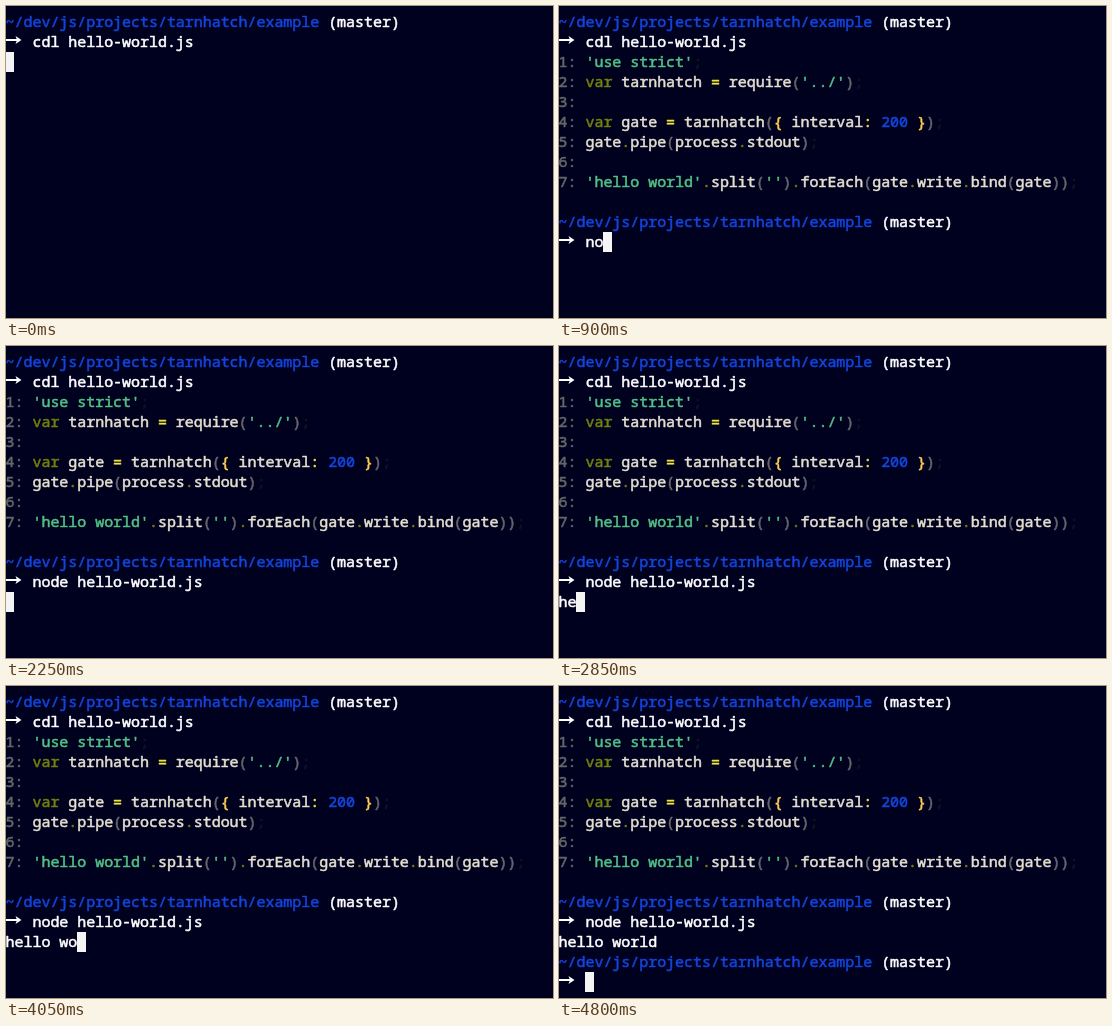
An HTML page with a canvas that plays this animation: 547 by 312 pixels, repeating every 5940 ms.

```html
<!DOCTYPE html>
<html lang="en">
<head>
<meta charset="utf-8">
<title>Terminal session</title>
<style>
html, body { margin: 0; width: 100%; height: 100%; overflow: hidden; background: #00001f; }
canvas { display: block; width: 547px; height: 312px; }
</style>
</head>
<body>
<canvas id="term" width="547" height="312"></canvas>
<script>
const ctx = document.getElementById('term').getContext('2d');
const CELL = 8.96, ROW = 20, TOP = 6, LOOP = 5940;

const color = {
  w: '#ffffff', // typed text
  b: '#1444dc', // path and numbers
  g: '#65676a', // gutter and parentheses
  s: '#52c285', // strings
  k: '#74800c', // keywords and dots
  i: '#e6e1cf', // identifiers
  y: '#ffcf50', // braces
  o: '#f2e63c', // operators
  d: '#101522'  // semicolons
};

// Each token starts with its colour key.
const listing = [
  ["s'use strict'", 'd;'],
  ['kvar', 'i tarnhatch', 'o = ', 'irequire', 'g(', "s'../'", 'g)', 'd;'],
  [],
  ['kvar', 'i gate', 'o = ', 'itarnhatch', 'g(', 'y{', 'i interval', 'o:', 'b 200', 'y }', 'g)', 'd;'],
  ['igate', 'k.', 'ipipe', 'g(', 'iprocess', 'k.', 'istdout', 'g)', 'd;'],
  [],
  ["s'hello world'", 'k.', 'isplit', 'g(', "s''", 'g)', 'k.', 'iforEach', 'g(',
   'igate', 'k.', 'iwrite', 'k.', 'ibind', 'g(', 'igate', 'g))', 'd;']
];

const command = 'node hello-world.js ';
const output = 'hello world';
const keyTimes = [900, 900, 1050, 1200, 1350, 1500, 1650];
const outTimes = [2550, 2850, 3000, 3150, 3450, 3600, 3750, 4050, 4200, 4350, 4650];

const passed = (times, t) => times.filter(x => x <= t).length;

// A thin outline gives the glyphs a medium weight.
function text(str, col, row, key) {
  ctx.fillStyle = ctx.strokeStyle = color[key];
  const y = TOP + row * ROW + 15;
  [...str].forEach((ch, n) => {
    if (ch === ' ') return;
    const x = (col + n) * CELL - 0.4;
    ctx.fillText(ch, x, y);
    ctx.strokeText(ch, x, y);
  });
  return col + str.length;
}

function tokens(list, col, row) {
  for (const tok of list) col = text(tok.slice(1), col, row, tok[0]);
}

function arrow(row) {
  const y = TOP + row * ROW + 8;
  ctx.fillStyle = color.w;
  ctx.fillRect(0, y - 1, 12, 2);
  ctx.beginPath();
  ctx.moveTo(9.5, y - 4);
  ctx.lineTo(15.5, y);
  ctx.lineTo(9.5, y + 4);
  ctx.lineTo(11, y);
  ctx.fill();
}

function prompt(row, typed) {
  tokens(['b~/dev/js/projects/tarnhatch/example', 'w (master)'], 0, row);
  arrow(row + 1);
  text(typed, 3, row + 1, 'w');
}

function cursor(col, row) {
  const x = Math.floor(col * CELL);
  ctx.fillStyle = '#f4f4f4';
  ctx.fillRect(x, TOP + row * ROW, Math.floor((col + 1) * CELL) - x, ROW);
}

function draw(t) {
  ctx.fillStyle = '#00001f';
  ctx.fillRect(0, 0, 547, 312);
  ctx.font = '500 15px "Noto Sans Mono", "DejaVu Sans Mono", monospace';
  ctx.lineWidth = 0.55;
  ctx.lineJoin = 'round';

  prompt(0, 'cdl hello-world.js');
  if (t < 150) return cursor(0, 2);

  listing.forEach((line, n) => tokens(['g' + (n + 1) + ': ', ...line], 0, n + 2));
  if (t < 300) return cursor(0, 9);

  const typed = command.slice(0, t < 1800 ? passed(keyTimes, t) : command.length);
  prompt(10, typed);
  if (t < 2250) return cursor(3 + typed.length, 11);

  const shown = output.slice(0, passed(outTimes, t));
  text(shown, 0, 12, 'w');
  if (t < 4800) return cursor(shown.length, 12);

  prompt(13, '');
  cursor(3, 14);
}

const start = performance.now();
function frame() {
  draw((performance.now() - start) % LOOP);
  requestAnimationFrame(frame);
}
frame();
</script>
</body>
</html>
```
